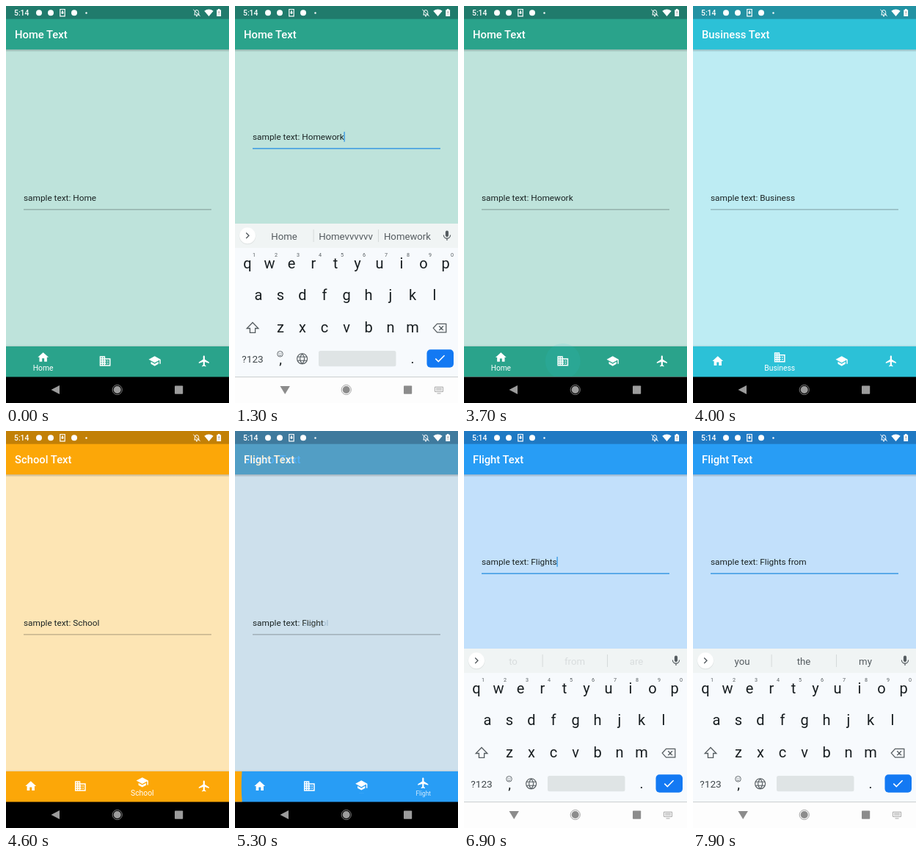
Recreate the animation shown at these times as an HTML page. Size 304x540 px, loop 8000 ms.

```html
<!DOCTYPE html>
<html lang="en">
<head>
<meta charset="utf-8">
<title>Tabs with text fields</title>
<style>
html, body { margin: 0; height: 100%; overflow: hidden; background: #000; }
svg { display: block; width: 100vw; height: 100vh; }
text { font-family: Roboto, "Noto Sans", sans-serif; white-space: pre; }
</style>
</head>
<body>
<svg id="stage" viewBox="0 0 304 540"></svg>
<script>
const LOOP = 8000, STEP = 100;
const SCALE = 0.739;                 // pixels per dp
const TOP = 59.1, BAR = 463, SYS = 504.5, KEYS = 296;
const ACCENT = '#3a9ae3';
const stage = document.getElementById('stage');

const pages = [
  { name: 'Home', main: '#2aa38b', pale: '#bee3db', dark: '#207b6c',
    icon: 'M10 20v-6h4v6h5v-8h3L12 3 2 12h3v8z' },
  { name: 'Business', main: '#2cc1d7', pale: '#bdecf3', dark: '#2292a3',
    icon: 'M12 7V3H2v18h20V7zM6 19H4v-2h2zm0-4H4v-2h2zm0-4H4V9h2zm0-4H4V5h2zm4 12H8v-2h2zm0-4H8v-2h2zm0-4H8V9h2zm0-4H8V5h2zm10 12h-8v-2h2v-2h-2v-2h2v-2h-2V9h8zm-2-8h-2v2h2zm0 4h-2v2h2z' },
  { name: 'School', main: '#fca708', pale: '#fde5b4', dark: '#c28006',
    icon: 'M5 13.18v4L12 21l7-3.82v-4L12 17zM12 3 1 9l11 6 9-4.91V17h2V9z' },
  { name: 'Flight', main: '#289df5', pale: '#c2e0fb', dark: '#1f79c3',
    icon: 'M21 16v-2l-8-5V3.5a1.5 1.5 0 0 0-3 0V9l-8 5v2l8-2.5V19l-2 1.5V22l3.5-1 3.5 1v-1.5L13 19v-5.5z' }
];

// Each row: start time, then value(s)
const tabSwitches = [[3700, 0.02, 0.4, 0.82, 1], [4400, 0.25, 0.8, 1], [5200, 0.25, 0.8, 1]];
const homeText = [[0, 'Home'], [1300, 'Homework']];
const flightText = [[0, 'Flight'], [6800, 'Flights'], [7300, 'Flights from']];
const hints = [
  [0, 'Home Homevvvvvv Homework'], [1400, 'for and the', 0.4], [1500, 'for and the'],
  [5000, 'Flight Flights Flightccvb'], [6900, 'to from are', 0.15],
  [7000, 'to from are', 0.6], [7100, 'to from are'], [7400, 'you the my']
];
const cursorOff = [[1700, 1900], [6600, 6800], [7600, 7700], [7900, 8000]];

const within = (t, a, b) => t >= a && t < b;
const latest = (rows, t) => rows.filter(r => r[0] <= t).pop();
const ramp = (t, start, values) => values[Math.min(values.length - 1, (t - start) / STEP)];
const mix = (a, b, p) => a + (b - a) * p;

const rect = (x, y, w, h, fill, more = '') =>
  `<rect x="${x}" y="${y}" width="${w}" height="${h}" fill="${fill}" ${more}/>`;
const circle = (x, y, r, fill, more = '') =>
  `<circle cx="${x}" cy="${y}" r="${r}" fill="${fill}" ${more}/>`;
const path = (d, fill, more = '') => `<path d="${d}" fill="${fill}" ${more}/>`;
const line = (d, color, width = 1.2) => path(d, 'none', `stroke="${color}" stroke-width="${width}"`);
const text = (x, y, s, size, fill, more = '') =>
  `<text x="${x}" y="${y}" font-size="${size}" fill="${fill}" ${more}>${s}</text>`;
const mid = (x, y, s, size, fill, more = '') => text(x, y, s, size, fill, 'text-anchor="middle" ' + more);
const group = (s, alpha, dy = 0) => `<g opacity="${alpha}" transform="translate(0 ${dy})">${s}</g>`;
const icon = (x, y, d, fill, k = SCALE) =>
  path(d, fill, `fill-rule="evenodd" transform="translate(${x} ${y}) scale(${k}) translate(-12 -12)"`);

const pen = document.createElement('canvas').getContext('2d');
function textWidth(s) {
  pen.font = '11.82px Roboto, "Noto Sans", sans-serif';
  return pen.measureText(s).width;
}

const statusIcons =
  text(11, 13.2, '5:14', 10.35, '#fff', 'font-weight="500"') +
  circle(45, 9.2, 4, '#fff') + circle(61, 9.2, 4, '#fff') + circle(93, 9.2, 4, '#fff') +
  circle(109.5, 9.5, 1.2, '#fff') +
  line('M73.8 4.5h6.4v9.4h-6.4z', '#fff', 1.2) +
  path('M76.2 6.3h1.6v2.4h1.5L77 11.3l-2.3-2.6h1.5z', '#fff') +
  line('M256.5 12h7M257.3 12V8.5a2.7 3 0 0 1 5.4 0V12M255.3 4.8l9.4 9', '#fff', 1) +
  circle(260, 13.4, 1, '#fff') +
  path('M270.3 6.8q6.2-4.6 12.4 0L276.5 14z', '#fff') +
  path('M287.3 5.2h1.6V4.1h2.6v1.1h1.6v8.7h-5.8z', '#fff') +
  path('M289.8 7h.9v3h-.9zm0 3.8h.9v1h-.9z', '#777');

function field(p, s, f) {
  const dy = f.up ? -83.4 : 0;
  const end = 24 + textWidth('sample text: ' + s);
  const shown = f.composing ? `<tspan text-decoration="underline">${s}</tspan>` : s;
  let out = text(24, 265.3, 'sample text: ' + shown, 11.82, '#1b2424');
  out += rect(24, 276.5, 256, f.thick, f.color);
  if (f.cursor) out += rect(end - 0.2, 254.5, 1.4, 13.6, ACCENT);
  if (f.handle) out += path('M0-9.2 5.7-3.6A8 8 0 1 1-5.7-3.6z', '#83bdf1', `transform="translate(${end - 0.6} 279)"`);
  if (f.toolbar) out += rect(70, 246.5, 145, 30, '#d5c6cf', 'rx="2" opacity=".35"');
  return group(out, 1, dy);
}

function page(i, s, f, alpha) {
  const p = pages[i];
  return group(
    rect(0, TOP - 1, 304, (f.up ? KEYS : BAR) - TOP + 1, p.pale) +
    rect(0, TOP, 304, 3.6, 'url(#shade)') +
    rect(0, 0, 304, 18, p.dark) + rect(0, 17.7, 304, TOP - 17.7, p.main) +
    text(12, 44.3, p.name + ' Text', 14.8, '#fff', 'font-weight="500"') +
    field(p, s, f), alpha);
}

function tabBar(from, to, p) {
  const weights = pages.map((_, i) => (i === to ? p : 0) + (i === from ? 1 - p : 0));
  const unit = 304 / 4.5;
  let x = 0;
  const centers = weights.map(w => {
    const width = unit * (1 + w / 2);
    x += width;
    return x - width / 2;
  });
  let out = rect(0, BAR - 2, 304, 2, 'url(#lift)') + rect(0, BAR, 304, 41.5, pages[from].main);
  if (p < 0.1) out += circle(centers[to], 483, 24, pages[to].main, 'opacity=".12"');
  else out += circle(centers[to], 483, mix(0, 310, p), pages[to].main, 'clip-path="url(#bar)"');
  pages.forEach((q, i) => {
    const w = weights[i], c = centers[i];
    out += icon(c, 483 - 5.2 * w, q.icon, '#fff');
    if (w > 0) out += mid(0, 3.7, q.name, 10.35, '#fff',
      `opacity="${Math.max(w, 0.2)}" transform="translate(${c} 492.6) scale(${w})"`);
  });
  return out;
}

function keyboard(t) {
  const ink = '#171d20', soft = '#555c60';
  const [, words, alpha = 1] = latest(hints, t);
  let out = rect(0, KEYS, 304, 245, '#f7fafd') + rect(0, KEYS, 304, 33, '#f0f4f4');
  if (t === 6800) out += rect(108, KEYS, 87, 32, '#dfe4e5');
  out += circle(17, 313, 11.3, '#dde1e1') + circle(17, 312.3, 11, '#fff') +
    line('M15.2 308.6l3.7 3.7-3.7 3.7', soft, 1.4);
  out += rect(106.7, 304, 0.8, 17, '#cfd4d4') + rect(195.2, 304, 0.8, 17, '#cfd4d4');
  out += group(words.split(' ').map((w, i) => mid(67 + 84 * i, 317.5, w, 13.2, soft)).join(''), alpha);
  out += rect(286.9, 305.6, 4.2, 8.6, soft, 'rx="2.1"') +
    line('M284.4 311.5a4.6 4.6 0 0 0 9.2 0M289 316v3', soft);

  ['qwertyuiop', 'asdfghjkl', 'zxcvbnm'].forEach((row, r) =>
    [...row].forEach((c, i) => {
      const x = [17, 32, 62][r] + 30 * i;
      out += mid(x, 356.8 + 43.5 * r, c, 20, ink);
      if (!r) out += mid(x + 9, 341.3, (i + 1) % 10, 7.2, soft);
    }));
  out += line('M24 430.5l7.8 8h-4.2v5.8h-7.2v-5.8h-4.2z', soft, 1.3);
  out += line('M275.5 432.3h12.3v11.6h-12.3l-5.2-5.8zM278.2 435.3l5.8 5.8m0-5.8l-5.8 5.8', soft, 1.3);

  out += mid(24, 484.6, '?123', 13.6, '#3f464a') + mid(62, 486.5, ',', 19, ink) + mid(242, 486.3, '.', 19, ink);
  out += circle(61.5, 473.3, 3.8, 'none', `stroke="${soft}" stroke-width=".9"`) +
    circle(60.2, 472.3, 0.6, soft) + circle(62.8, 472.3, 0.6, soft) +
    line('M59.6 474.3q1.9 2.4 3.8 0', soft, 0.8);
  out += line('M84.6 479.8a7 7 0 0 1 14 0 7 7 0 0 1-14 0M85.4 477.3h12.4M85.4 482.3h12.4M91.6 472.8q-6 7 0 14q6-7 0-14', soft, 1.1);
  out += rect(114, 469, 105.5, 21.3, '#dfe4e5', 'rx="2.5"');
  out += rect(261.5, 467.3, 36.5, 24.4, '#1379f3', 'rx="5"') + line('M273.3 479.6l4 4 8.3-8.3', '#fff', 1.5);
  return out;
}

function systemIcons(back, color) {
  return path(back, color) + circle(151.7, 522, 5, color) +
    circle(151.7, 522, 6.6, 'none', `stroke="${color}" stroke-width=".8"`) +
    rect(230, 516.5, 11.2, 11.2, color, 'rx=".8"');
}

function systemBar(alpha, closing) {
  const icons = systemIcons('M61.5 517h13.4l-6.7 11z', '#8c8c8c') +
    line('M272.5 518.2h11v6.4h-11z', '#a0a0a0', 0.9) +
    line('M274 520.2h8M274 522.2h8M275.5 527h5', '#a0a0a0', 0.9);
  return rect(0, SYS, 304, 36, '#000') + systemIcons('M73 516v12l-11.5-6z', '#9c9c9c') +
    group(rect(0, SYS, 304, 36, '#fdfdfd') + rect(0, SYS, 304, 0.8, '#e4e8e9'), alpha) +
    (alpha ? group(icons, closing ? 0.12 : 1, closing ? 4 : 0) : '');
}

function scene(t) {
  const start = t < 5000 ? 700 : 6000;
  const focused = within(t, 700, 2200) || t >= 6000;
  const closing = within(t, 2200, 2500);
  let alpha = 0, drop = 0;
  if (focused) {
    alpha = ramp(t, start, [0, 0.82, 0.97, 1]);
    drop = ramp(t, start, [27, 12, 5, 2, 0]);
  } else if (closing) {
    alpha = ramp(t, 2200, [0.97, 0.8, 0.32]);
    drop = ramp(t, 2200, [1, 7, 17]);
  }

  const f = {
    up: focused && t > start,
    composing: focused && (t < 1300 || within(t, 6000, 6800)),
    cursor: focused && !cursorOff.some(([a, b]) => within(t, a, b)),
    handle: within(t, 700, 1300) || within(t, 6000, 6800),
    toolbar: focused && t === start + STEP,
    thick: focused ? ramp(t, start, [0.9, 1.5]) : closing ? 1 : 0.8,
    color: focused ? ACCENT : closing ? '#4f8fae' : 'rgba(0,0,0,.42)'
  };

  const sw = latest(tabSwitches, t);
  const to = sw ? tabSwitches.indexOf(sw) + 1 : 0;
  const from = Math.max(0, to - 1);
  const p = sw ? ramp(t, sw[0], sw.slice(1)) : 1;
  const content = i => i === 0 ? latest(homeText, t)[1] : i === 3 ? latest(flightText, t)[1] : pages[i].name;

  let out = rect(0, 0, 304, 540, '#fcfaf5');
  if (p < 1) out += page(from, content(from), f, 1);
  if (p > 0.1) out += page(to, content(to), f, p);
  out += statusIcons + tabBar(from, to, p);
  if (alpha) out += group(keyboard(t), alpha, drop);
  return out + systemBar(alpha, closing);
}

const gradient = (id, a, b) => `<linearGradient id="${id}" x2="0" y2="1">
  <stop stop-opacity="${a}"/><stop offset="1" stop-opacity="${b}"/></linearGradient>`;
const defs = `<defs>${gradient('shade', 0.22, 0)}${gradient('lift', 0, 0.1)}
  <clipPath id="bar"><rect y="${BAR}" width="304" height="42"/></clipPath></defs>`;

const begin = performance.now();
let shown = -1;
function draw() {
  const t = Math.floor((performance.now() - begin) % LOOP / STEP) * STEP;
  if (t !== shown) {
    stage.innerHTML = defs + scene(t);
    shown = t;
  }
  requestAnimationFrame(draw);
}
draw();
</script>
</body>
</html>
```
